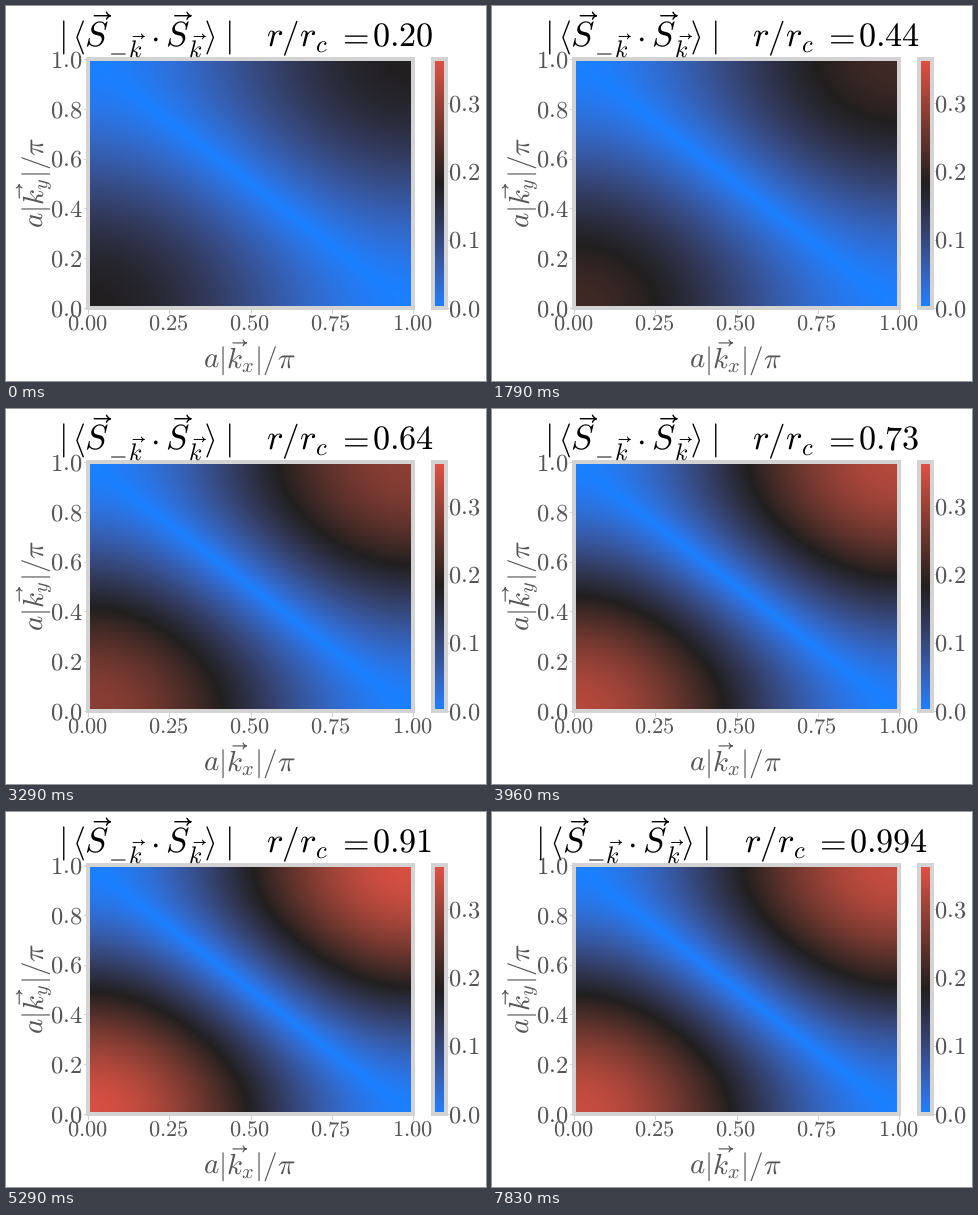
A matplotlib script that plays this animation: 480x375 px, repeating every 8 s.

```python
import numpy as np
import matplotlib.pyplot as plt
from matplotlib.animation import FuncAnimation
from matplotlib.colors import ListedColormap, to_rgb
from matplotlib.patches import PathPatch, Rectangle
from matplotlib.path import Path
from matplotlib.transforms import Affine2D

plt.rcParams.update({"mathtext.fontset": "cm", "text.hinting": "none"})

W, H, DPI = 480, 375, 100
INTERVAL, FRAMES, FPS = 40, 200, 24
LEFT, RIGHT, TOP, BOTTOM = 82, 407, 53, 302
VMAX = 0.3645
GREY, FRAME = "#555555", "#d3d3d3"
TITLE, BASE = 34.2, 40

TO_XYZ = np.array([[.4124, .3576, .1805],
                   [.2126, .7152, .0722],
                   [.0193, .1192, .9505]])
WHITE = TO_XYZ.sum(axis=1)
TO_LAB = np.array([[0, 116, 0], [500, -500, 0], [0, 200, -200]])


def rgb_to_lab(color):
    c = np.array(to_rgb(color))
    linear = np.where(c > .04045, ((c + .055) / 1.055) ** 2.4, c / 12.92)
    t = TO_XYZ @ linear / WHITE
    f = np.where(t > .008856, np.cbrt(t), 7.787 * t + 16 / 116)
    return TO_LAB @ f - (16, 0, 0)


def lab_to_rgb(lab):
    f = (lab + (16, 0, 0)) @ np.linalg.inv(TO_LAB).T
    t = np.where(f > .2069, f ** 3, (f - 16 / 116) / 7.787)
    linear = np.clip((t * WHITE) @ np.linalg.inv(TO_XYZ).T, 0, 1)
    return np.where(linear > .0031308,
                    1.055 * linear ** (1 / 2.4) - .055, 12.92 * linear)


def lab_colormap(colors, n=512):
    """Colormap that is linear in CIELAB between the given colours."""
    stops = np.array([rgb_to_lab(c) for c in colors])
    t, at = np.linspace(0, 1, n), np.linspace(0, 1, len(colors))
    lab = np.column_stack([np.interp(t, at, channel) for channel in stops.T])
    return ListedColormap(np.clip(lab_to_rgb(lab), 0, 1))


CMAP = lab_colormap(["#1a80ff", "#211f1f", "#e05244"])

fig = plt.figure(figsize=(W / DPI, H / DPI), dpi=DPI, facecolor="white")
ax = fig.add_axes([0, 0, 1, 1])
ax.axis("off")
title_shift = Affine2D()
plain = ax.transData
shifted = title_shift + plain


def px(size):
    return size * 72 / DPI


def label(x, y, tex, size, color=GREY, transform=plain, **kw):
    kw = {"ha": "left", "va": "baseline", **kw}
    return ax.text(x, y, f"${tex}$", fontsize=px(size), color=color,
                   transform=transform, **kw)


def stroke(points, codes, x, y, size, color, transform, angle=0):
    """Thin glyph given in em units, with its origin at (x, y)."""
    place = Affine2D().scale(size, -size).rotate_deg(-angle).translate(x, y)
    ax.add_patch(PathPatch(Path(place.transform(points), codes), fill=False,
                           ec=color, lw=px(0.04 * size), capstyle="round",
                           joinstyle="round", transform=transform))


def vec(x, y, size, color=GREY, transform=plain, skew=0.19, angle=0):
    """Arrow accent above a tall letter."""
    points = np.array([(0, 0), (.46, 0), (.35, .1), (.38, .02), (.46, 0),
                       (.38, -.02), (.35, -.1)]) + (skew, 0.865)
    codes = [Path.MOVETO, Path.LINETO, Path.MOVETO] + [Path.CURVE3] * 4
    stroke(points, codes, x, y, size, color, transform, angle)


def bracket(x, tip, back):
    stroke(np.array([(back, .73), (tip, .25), (back, -.23)]), None,
           x, BASE, TITLE, "black", shifted)


def box(x0, x1):
    ax.add_patch(Rectangle((x0, TOP), x1 - x0, BOTTOM - TOP, fill=False,
                           ec=FRAME, lw=px(4), joinstyle="miter", zorder=3,
                           snap=False))


def tick(x, y, dx, dy):
    ax.plot([x, x + dx], [y, y + dy], color=FRAME, lw=px(1), zorder=1)


# Structure factor on the quarter zone
kx = np.pi * (np.arange(RIGHT - LEFT) + 0.5) / (RIGHT - LEFT)
ky = np.pi * (np.arange(BOTTOM - TOP)[::-1] + 0.5) / (BOTTOM - TOP)
gamma = np.abs(np.cos(kx)[None, :] + np.cos(ky)[:, None]) / 2


def amplitude(r):
    return np.interp(r, [.2, .34, .54, .64, .75, .83, .87, .94, .994],
                     [.183, .196, .232, .286, .333, .357, .363, .352, .343])


image = ax.imshow(gamma, cmap=CMAP, vmin=0, vmax=VMAX, aspect="auto",
                  extent=(LEFT, RIGHT, BOTTOM, TOP))
ax.imshow(np.linspace(1, 0, 249)[:, None], cmap=CMAP, vmin=0, vmax=1,
          aspect="auto", extent=(427, 440, BOTTOM, TOP))
ax.set(xlim=(0, W), ylim=(H, 0))
box(LEFT, RIGHT)
box(427, 440)

for v in np.linspace(0, 1, 6):
    y = BOTTOM - v * (BOTTOM - TOP)
    tick(80, y, -2.5, 0)
    label(76.5, y + 8.2, f"{v:.1f}", 24.5, ha="right")
for v in np.linspace(0, 1, 5):
    x = LEFT + v * (RIGHT - LEFT)
    tick(x, 304, 0, 2.5)
    label(x - 1, 325, f"{v:.2f}", 22.4, ha="center")
for v in (0, .1, .2, .3):
    y = BOTTOM - v / VMAX * (BOTTOM - TOP)
    tick(442, y, 2, 0)
    label(441.5, y + 8.2, f"{v:.1f}", 24.5)

# Axis labels
AXIS = 29
label(197, 362, r"a|k_x|/\pi", AXIS)
vec(198 + 0.807 * AXIS, 362, AXIS)
label(38.3, 222, r"a|k_y|/\pi", AXIS, rotation=90, rotation_mode="anchor")
vec(38.3, 221 - 0.807 * AXIS, AXIS, angle=90)

# Title
SUB, SUB_BASE, LETTER = 24, 51.2, 35
for x, tex in ((51.5, "|"), (144, r"\cdot"), (217.5, "|"), (330, "{=}")):
    label(x, BASE, tex, TITLE, "black", shifted)
for x, tex in ((78.5, "S"), (159, "S"), (260.5, "r/r_c")):
    label(x, BASE, tex, LETTER, "black", shifted)
bracket(66.5, 0.13, 0.315)
bracket(198.5, 0.26, 0.075)
for x in (78.5, 159):
    vec(x + 1, BASE, LETTER, "black", shifted, skew=0.25)
label(102.5, SUB_BASE, r"{-}", SUB, "black", shifted)
for x in (121.5, 182.5):
    label(x, SUB_BASE, "k", SUB, "black", shifted)
    vec(x + 1, SUB_BASE, SUB, "black", shifted)
value = label(366, BASE, "0.20", TITLE, "black", shifted)


def ratio(step):
    """Linear sweep, then two held values close to the critical point."""
    if step < 140:
        return 0.2 + 0.78 * step / 139, 2
    return (0.991 if step < 188 else 0.994), 3


def update(i):
    step = int((i * INTERVAL + 35) * FPS / 1000)
    r, digits = ratio(step)
    image.set_data(amplitude(r) * gamma)
    value.set_text(f"${r:.{digits}f}$")
    title_shift.clear().translate(-TITLE / 4 * (digits - 2), 0)
    return image, value


anim = FuncAnimation(fig, update, frames=FRAMES, interval=INTERVAL,
                     repeat=True, repeat_delay=0, blit=False)
plt.show()
```
